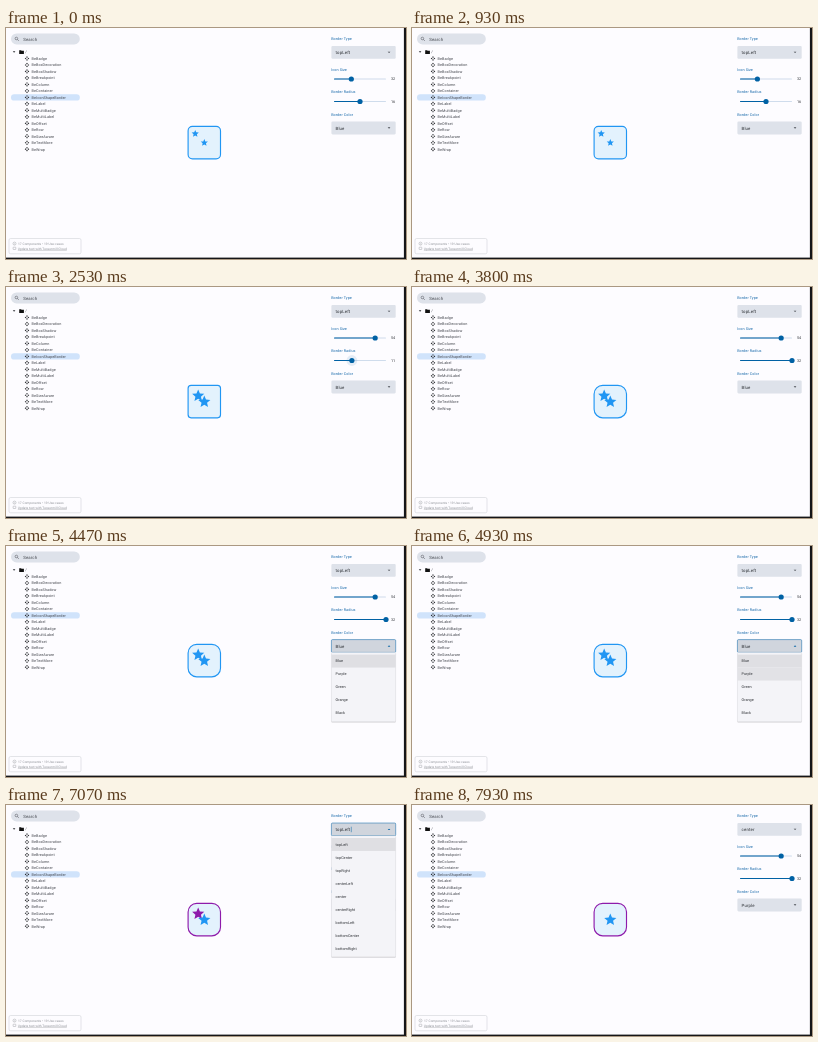
Recreate the animation shown at these times as an HTML page. Size 400 by 231 pixels, loop 8000 ms.

```html
<!DOCTYPE html>
<html lang="en">
<head>
<meta charset="utf-8">
<title>Component browser</title>
<style>
html, body { margin: 0; width: 100%; height: 100%; overflow: hidden; background: #fdfcff; }
svg { display: block; width: 100vw; height: 100vh; }
text { font-family: Roboto, "Open Sans", sans-serif; text-rendering: geometricPrecision; white-space: pre; }
</style>
</head>
<body>
<svg id="stage" viewBox="0 0 400 231" preserveAspectRatio="none"></svg>
<script>
const LOOP = 8000, STEP = 200 / 3;
const UNIT = 0.27; // stage pixels per interface pixel
const INK = '#44474e', ACCENT = '#0061a4', FIELD = '#dee2ea', BLUE = '#2196f3', PURPLE = '#8e1bab';
const STAR = 'M12 17.27 18.18 21l-1.64-7.03L22 9.24l-7.19-.61L12 2 9.19 8.63 2 9.24l5.46 4.73L5.82 21z';
const ITEMS = ['BeBadge', 'BeBoxDecoration', 'BeBoxShadow', 'BeBreakpoint', 'BeColumn', 'BeContainer',
  'BeIconShapeBorder', 'BeLabel', 'BeMultiBadge', 'BeMultiLabel', 'BeOffset', 'BeRow', 'BeSizeAware',
  'BeTextMore', 'BeWrap'];
const COLORS = ['Blue', 'Purple', 'Green', 'Orange', 'Black'];
const PLACES = ['topLeft', 'topCenter', 'topRight', 'centerLeft', 'center', 'centerRight',
  'bottomLeft', 'bottomCenter', 'bottomRight'];
const SIZE_KEYS = [[930, 32], [1133, 35], [1200, 35], [1733, 54]];
const RADIUS_KEYS = [[2200, 16], [2533, 11], [2667, 11], [2800, 17], [3133, 17], [3400, 32]];
const COLOR_HOVER = [[0, 0], [4660, 1]];
const PLACE_HOVER = [[0, 0], [7195, 1], [7260, 2], [7330, 3], [7460, 4]];

const text = (x, cy, str, px = 14, fill = INK, track = 0.25, extra = '') => {
  const size = px * UNIT;
  return `<text x="${x}" y="${cy + size * 0.355}" font-size="${size}" letter-spacing="${track * UNIT}" fill="${fill}" ${extra}>${str}</text>`;
};
const rect = (x, y, w, h, fill, r = 0, extra = '') =>
  `<rect x="${x}" y="${y}" width="${w}" height="${h}" rx="${r}" fill="${fill}" ${extra}/>`;
const path = (d, fill, extra = '') => `<path d="${d}" fill="${fill}" ${extra}/>`;
const circle = (x, y, r, fill, extra = '') => `<circle cx="${x}" cy="${y}" r="${r}" fill="${fill}" ${extra}/>`;

function interpolate(keys, t) {
  if (t <= keys[0][0]) return keys[0][1];
  for (let i = 1; i < keys.length; i++) {
    const [t0, a] = keys[i - 1], [t1, b] = keys[i];
    if (t < t1) return a + (b - a) * (t - t0) / (t1 - t0);
  }
  return keys[keys.length - 1][1];
}
const held = (keys, t) => keys.reduce((v, [at, next]) => t >= at ? next : v, 0);
const between = (t, a, b) => t >= a && t < b;

function widgetIcon(x, y) {
  return [[0, -1.4], [1.4, 0], [0, 1.4], [-1.4, 0]].map(([dx, dy]) =>
    path(`M${x + dx} ${y + dy - 0.85}l.85 .85-.85 .85-.85-.85z`, '#25272b')).join('');
}

function sidebar() {
  const tree = ITEMS.map((name, i) => {
    const y = 30.5 + i * 6.48;
    const mark = name === 'BeIconShapeBorder' ? rect(5, y - 3.2, 68.8, 6.4, '#d0e3fb', 3.2) : '';
    return mark + widgetIcon(21, y) + text(25.6, y, name);
  }).join('');
  return rect(5, 5.4, 68.8, 11, FIELD, 5.5) +
    circle(10.4, 10.5, 1.3, 'none', `stroke="${INK}" stroke-width=".5"`) +
    path('M11.3 11.4l1.5 1.5', 'none', `stroke="${INK}" stroke-width=".55"`) +
    text(17.2, 11, 'Search', 16, INK, 0.5) +
    path('M6.8 23.3h2.6l-1.3 1.5z', '#25272b') +
    path('M13.2 22.2h1.8l.6.6h2.3v3.2h-4.7z', '#111') +
    text(19.2, 24, '/') + tree;
}

function footer() {
  const grey = '#8b8e94', line = `stroke="${grey}" stroke-width=".4"`;
  return rect(3, 210.5, 72, 15.3, 'none', 1.6, 'stroke="#c8cad0" stroke-width=".5"') +
    circle(8.5, 215.6, 1.5, 'none', line) + path('M8.5 215.4v1', 'none', line) +
    text(12, 215.6, '17 Components • 19 Use-cases', 12, grey, 0.1) +
    rect(7.1, 219.2, 2.7, 2.3, 'none', 0.4, line) +
    text(11.8, 220.5, 'Update text with Tessermill Cloud', 12, grey, 0.1, 'text-decoration="underline"');
}

function preview(s) {
  const x = 182.1, y = 98.4, w = 32.4, mid = w / 2, tint = s.purple ? PURPLE : BLUE;
  const icon = s.size * UNIT;
  const star = (cx, cy, fill) =>
    path(STAR, fill, `transform="translate(${cx - icon / 2} ${cy - icon / 2}) scale(${icon / 24})"`);
  const corner = 2.8 + icon / 2;
  return rect(x, y, w, w, '#e3f2fd', s.radius * UNIT, `stroke="${tint}" stroke-width="1.15"`) +
    (s.centered ? '' : star(x + corner, y + corner, tint)) +
    star(x + mid, y + mid, BLUE);
}

const label = (y, str) => text(325.2, y, str, 14, '#1769aa');

function field(y, value, hover, open) {
  const cy = y + 6.4, d = open ? -1 : 1;
  const line = open ? `stroke="${ACCENT}" stroke-width=".5"` : '';
  return rect(325.4, y, 64.3, 12.8, open || hover ? '#d0d5dd' : FIELD, 1.1, line) +
    text(329.6, cy, value, 16, '#2b2e33', 0.5) +
    path(`M381.7 ${cy - 0.65 * d}h2.7l-1.35 ${1.35 * d}z`, open ? ACCENT : INK);
}

function slider(y, part, value, active) {
  const x = 328 + 52 * part;
  return rect(328, y - 0.5, 52, 1, '#cfdcec', 0.5) + rect(328, y - 0.55, x - 328, 1.1, ACCENT, 0.5) +
    (active ? circle(x, y, 5.4, ACCENT, 'opacity=".1"') : '') +
    circle(x, y, 2.6, ACCENT) + text(385, y, Math.round(value), 14, '#303339', 0);
}

function menu(y, names, selected, hovered) {
  const row = 48 * UNIT, h = names.length * row + 4.3;
  const rows = names.map((name, i) => {
    const top = y + 2.1 + i * row;
    const fill = i === selected ? '#dfdfe3' : i === hovered ? '#e2e2e6' : '';
    return (fill ? rect(325.4, top, 64.3, row, fill) : '') + text(329.6, top + row / 2, name, 14, '#2b2e33', 0.1);
  }).join('');
  return rect(325.1, y + 0.6, 64.9, h + 0.5, '#000', 1.1, 'opacity=".12"') +
    rect(325.4, y, 64.3, h, '#f4f4f8', 1) + rect(325.4, y, 64.3, h, 'none', 1, 'stroke="#d8d9df" stroke-width=".25"') + rows;
}

function panel(t, s) {
  const colorOpen = between(t, 4260, 5060), placeOpen = between(t, 7060, 7660);
  const caret = placeOpen ? rect(344.9, 21.7, 0.5, 5.5, ACCENT) : '';
  return label(11, 'Border Type') +
    field(18, s.centered ? 'center' : 'topLeft', between(t, 6860, 7060), placeOpen) + caret +
    label(41.2, 'Icon Size') + slider(51, (s.size - 16) / 48, s.size, between(t, 1000, 1860)) +
    label(64, 'Border Radius') + slider(73.5, s.radius / 32, s.radius, between(t, 2260, 3670)) +
    label(86.5, 'Border Color') +
    field(93.6, s.purple ? 'Purple' : 'Blue', between(t, 4130, 4260), colorOpen) +
    (colorOpen ? menu(106.5, COLORS, 0, held(COLOR_HOVER, t)) : '') +
    (placeOpen ? menu(30.9, PLACES, 0, held(PLACE_HOVER, t)) : '');
}

const stage = document.getElementById('stage');
stage.innerHTML = rect(0, 0, 400, 231, '#fdfcff') + sidebar() + footer() +
  '<g id="live"></g>' + rect(397.9, 0, 2.1, 231, '#151517') + rect(0, 229.6, 400, 1.4, '#151517');
const live = document.getElementById('live');

let shown = -1;
function draw(ms) {
  const step = Math.floor((ms % LOOP + 5) / STEP);
  if (step === shown) return;
  shown = step;
  const t = step * STEP;
  const state = {
    size: interpolate(SIZE_KEYS, t),
    radius: interpolate(RADIUS_KEYS, t),
    purple: t >= 5060 && t < LOOP - 1,
    centered: t >= 7660 && t < LOOP - 1
  };
  live.innerHTML = preview(state) + panel(t, state);
}

const start = performance.now();
function tick() {
  draw(performance.now() - start);
  requestAnimationFrame(tick);
}
draw(0);
requestAnimationFrame(tick);
</script>
</body>
</html>
```
